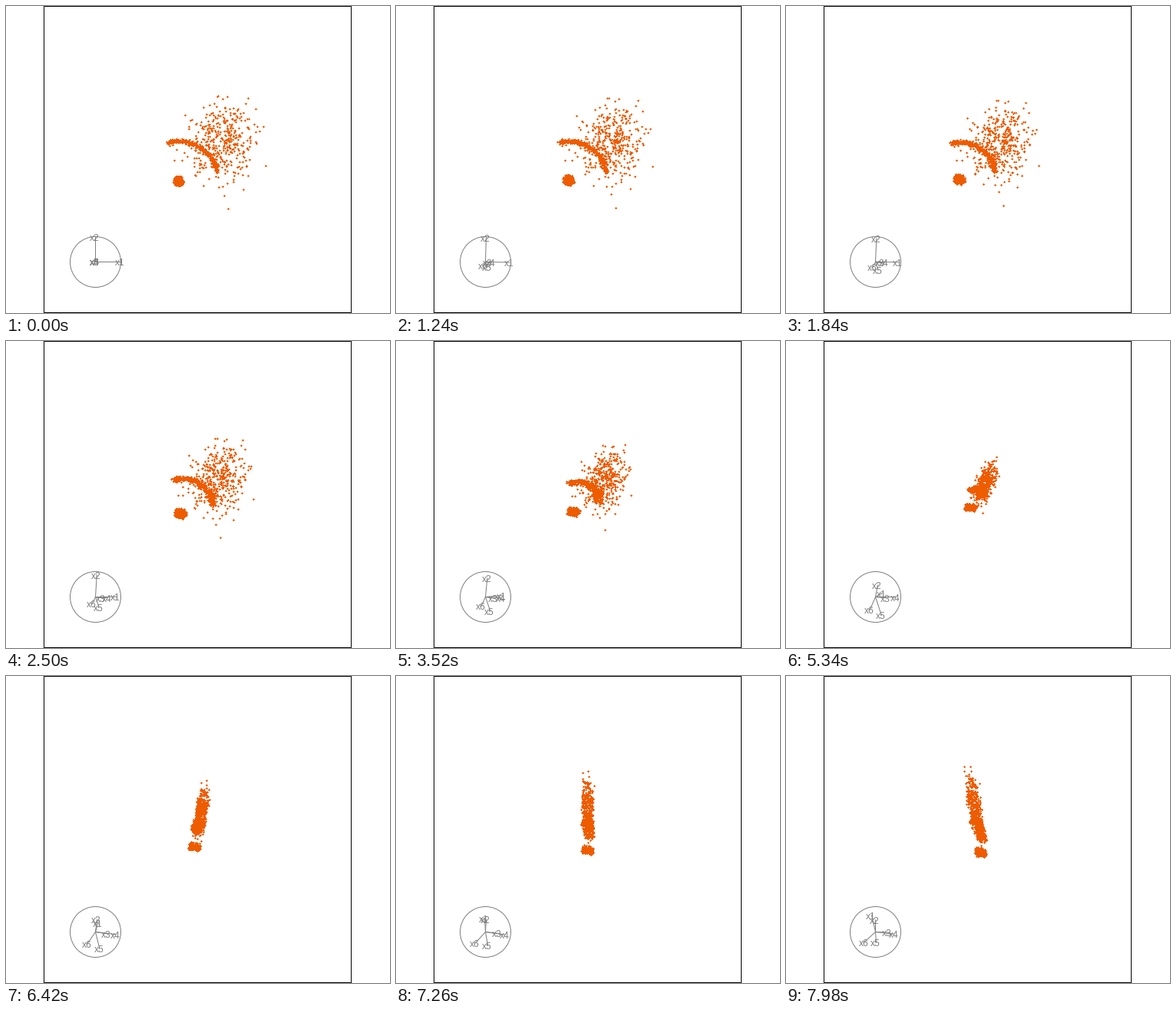
A matplotlib script for the animation above (8 s loop, 500 by 400 pixels).

```python
import numpy as np
import matplotlib.pyplot as plt
from matplotlib.animation import FuncAnimation
from matplotlib.patches import Circle, PathPatch, Rectangle
from matplotlib.path import Path

W, H, DPI = 500, 400, 100
TICK, LOOP = 20, 8000
PX = 72 / DPI
ORANGE, GREY = "#ee5c00", "#7f7f7f"
ORIGIN = np.array([249.5, 199.5])
HUB, RADIUS = np.array([116.5, 333.5]), 33
BLOB = np.array([224.5, 228])
FLIP = np.array([1, -1])
N = 400

rng = np.random.default_rng(11)


def polar(center, radius, angle):
    return center + radius[:, None] * np.c_[np.cos(angle), -np.sin(angle)]


# Three clusters in the x1-x2 plane, flat noise in the other four axes.
cloud = rng.normal([280, 177], [22, 24], (N, 2))
arc = polar(BLOB, rng.normal(52, 1.4, N), np.radians(rng.uniform(12, 107, N)))
blob = polar(BLOB, np.minimum(np.abs(rng.normal(0, 4, N)), 6.5),
             rng.uniform(0, 2 * np.pi, N))
plane = (np.vstack([cloud, arc, blob]) - ORIGIN) * FLIP
noise = rng.uniform(-1, 1, (3 * N, 4)) * [2.5, 8, 2.5, 2.5]
data = np.hstack([plane, noise])


def basis(x, y):
    """Orthonormal pair of projection rows."""
    x = np.array(x) / np.linalg.norm(x)
    y = y - x * (x @ y)
    return np.array([x, y / np.linalg.norm(y)])


START = np.eye(2, 6)
TURN = basis([9, 3, 14, 27, 8, -7], [4.5, 15.5, -1.5, -0.5, -24.5, -16.5])
END = basis([-5, 0, 16, 25, 1, -15], [21.5, 15.5, -0.5, -2.5, -13.5, -13.5])
TURN_STEP, END_STEP = 114, 171


def slerp(a, b, u):
    w = np.arccos(a @ b)
    return (np.sin((1 - u) * w) * a + np.sin(u * w) * b) / np.sin(w)


def projection(step):
    if step < TURN_STEP:
        a, b, u = START, TURN, step / TURN_STEP
    else:
        a, b = TURN, END
        u = (step - TURN_STEP) / (END_STEP - TURN_STEP)
    return basis(slerp(a[0], b[0], u), slerp(a[1], b[1], u))


def step_at(ms):
    """Three steps per 140 ms, held for 20, 100 and 20 ms."""
    cycle, phase = divmod(ms, 140)
    return 3 * cycle + (phase >= 20) + (phase >= 120)


# A dot is a plus of five pixels: one wide bar and one tall bar.
def bar(x, y, w, h):
    return [(x, y), (x + w, y), (x + w, y + h), (x, y + h), (x, y)]


PLUS = np.array(bar(-1, 0, 3, 1) + bar(0, -1, 1, 3))
BAR_CODES = [Path.MOVETO] + [Path.LINETO] * 3 + [Path.CLOSEPOLY]
CODES = np.tile(BAR_CODES, 2 * len(data))


def dot_path(points):
    corners = np.rint(points)[:, None, :] + PLUS
    return Path(corners.reshape(-1, 2), CODES)


fig = plt.figure(figsize=(W / DPI, H / DPI), dpi=DPI, facecolor="white")
ax = fig.add_axes([0, 0, 1, 1])
ax.set(xlim=(0, W), ylim=(H, 0))
ax.axis("off")

ax.add_patch(Rectangle((49, 0), 401, 400, fc="black", lw=0))
ax.add_patch(Rectangle((50, 1), 399, 398, fc="white", lw=0))
ax.add_patch(Circle(HUB, RADIUS, fill=False, ec=GREY, lw=PX, snap=False))
spokes = [ax.plot([], [], color=GREY, lw=PX, snap=False)[0] for _ in range(6)]
names = [ax.text(0, 0, f"x{i + 1}", color=GREY, size=12 * PX, ha="center",
                 va="baseline", family="Liberation Sans") for i in range(6)]
dots = ax.add_patch(PathPatch(dot_path(data[:, :2]), fc=ORANGE, lw=0,
                              snap=False, zorder=3))


def update(frame):
    proj = projection(step_at(frame * TICK))
    dots.set_path(dot_path(ORIGIN + data @ proj.T * FLIP))
    for end, spoke, name in zip(HUB + proj.T * FLIP * RADIUS, spokes, names):
        spoke.set_data(*zip(HUB, end))
        name.set_position(end + [-1, 5])
    return [dots, *spokes, *names]


anim = FuncAnimation(fig, update, frames=LOOP // TICK, interval=TICK,
                     repeat=True, repeat_delay=0)
plt.show()
```
